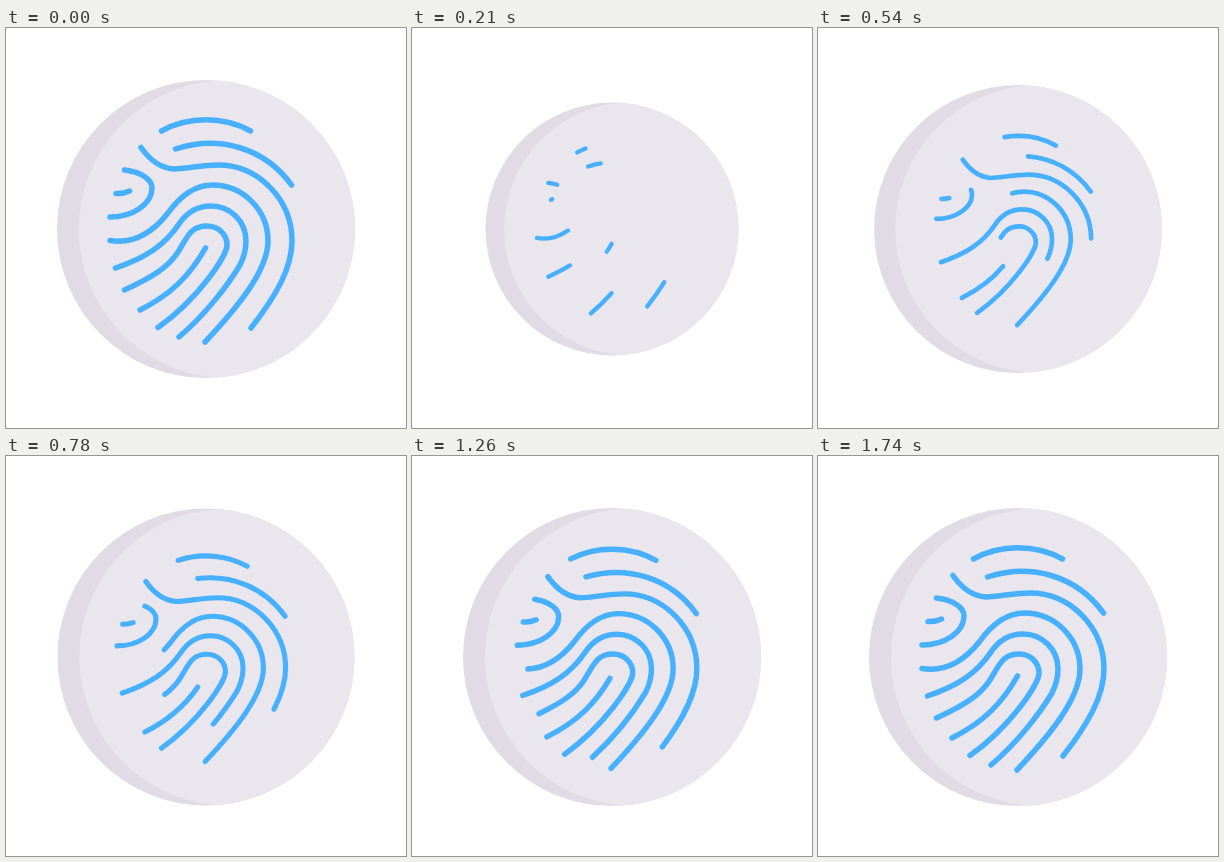
Recreate the animation shown at these times as an HTML page. Size 400 by 400 pixels, loop 3.8 s.

```html
<!DOCTYPE html>
<html lang="en">
<head>
<meta charset="utf-8">
<title>Fingerprint</title>
<style>
  html, body { margin: 0; width: 100%; height: 100%; overflow: hidden; background: #fff; }
  svg { display: block; width: 100%; height: 100%; }
</style>
</head>
<body>
<svg viewBox="0 0 400 400">
  <g id="disc">
    <circle cx="200" cy="201" r="149" fill="#e0dbe4"/>
    <path fill="#eae6ed" d="M211 52.4A149 149 0 0 1 211 349.6A149 149 0 0 1 211 52.4Z"/>
  </g>
  <g id="print" fill="none" stroke="#47b0ff" stroke-width="5.5" stroke-linecap="round" stroke-linejoin="round"></g>
</svg>
<script>
const LOOP = 3800, STEP = 30;
const TURN = 270, DISC_END = 1080, PRINT_END = 1740;

// Each ridge starts at the end that vanishes last.
const ridges = [
  'M155.5 103C182 88 218 88 244.5 103',
  'M169.5 121C212 107 258 119 285.5 157',
  'M245 300C270 268 286 240 286 213C286 172 253 137 212 137C197 137 178 141 168 141C153 140 143 131 135 119.5',
  'M123.5 163Q117 166 110 165.5',
  'M118.5 142C136 144 146 152 146 160C146 176 127 189 104 189',
  'M104 212.5C132 217 151 199 162 185C175 167 189 157 206.5 157C237 157 262 182 262 213C262 243 230 281 199 314',
  'M173 309C200 286 222 257 234 237C238 229 240 221 240 213C240 193 224 178 205 178C192 178 181 184 173 196C158 218 139 230 109.5 240',
  'M118.5 262C149 248 163 238 172 224C181 210 184 198 201 198C213 198 221 207 221 217C221 228 192 271 152 299.5',
  'M199.5 220C184 247 166 266 134 282'
];

const disc = document.getElementById('disc');
const print = document.getElementById('print');
for (const d of ridges) {
  const path = document.createElementNS('http://www.w3.org/2000/svg', 'path');
  path.setAttribute('d', d);
  path.setAttribute('pathLength', 1);
  print.append(path);
}

const clamp = x => Math.min(1, Math.max(0, x));
const span = (t, a, b) => clamp((t - a) / (b - a));
const smooth = x => x * x * (3 - 2 * x);
const quartOut = x => 1 - (1 - x) ** 4;

function bezier(x1, y1, x2, y2) {
  const at = (a, b, s) => 3 * a * s * (1 - s) ** 2 + 3 * b * s * s * (1 - s) + s ** 3;
  return x => {
    if (x <= 0 || x >= 1) return clamp(x);
    let lo = 0, hi = 1;
    for (let i = 0; i < 24; i++) {
      const mid = (lo + hi) / 2;
      if (at(x1, x2, mid) < x) lo = mid; else hi = mid;
    }
    return at(y1, y2, lo);
  };
}

const swell = bezier(0.167, 0, 0.1, 1);
const redraw = bezier(0, 0.5, 0.19, 1);

function zoom(el, s) {
  el.setAttribute('transform', `translate(200 201) scale(${s}) translate(-200 -201)`);
}

function trim(from, to) {
  const len = to - from;
  print.setAttribute('visibility', len > 0.002 ? 'visible' : 'hidden');
  print.setAttribute('stroke-dasharray', len > 0.999 ? 'none' : `${len} 2`);
  print.setAttribute('stroke-dashoffset', -from);
}

function draw(t) {
  const back = smooth(span(t, 0, TURN));
  const grow = span(t, TURN, PRINT_END);
  zoom(disc, 1 - 0.173 * (back - quartOut(span(t, TURN, DISC_END))));
  zoom(print, 1 - 0.25 * (back - swell(grow)));
  if (t < TURN) trim(0, 1 - back);
  else trim(1 - redraw(grow), 1);
}

const start = performance.now();
function tick() {
  const t = (performance.now() - start) % LOOP;
  draw(Math.floor(t / STEP) * STEP);
  requestAnimationFrame(tick);
}
tick();
</script>
</body>
</html>
```
